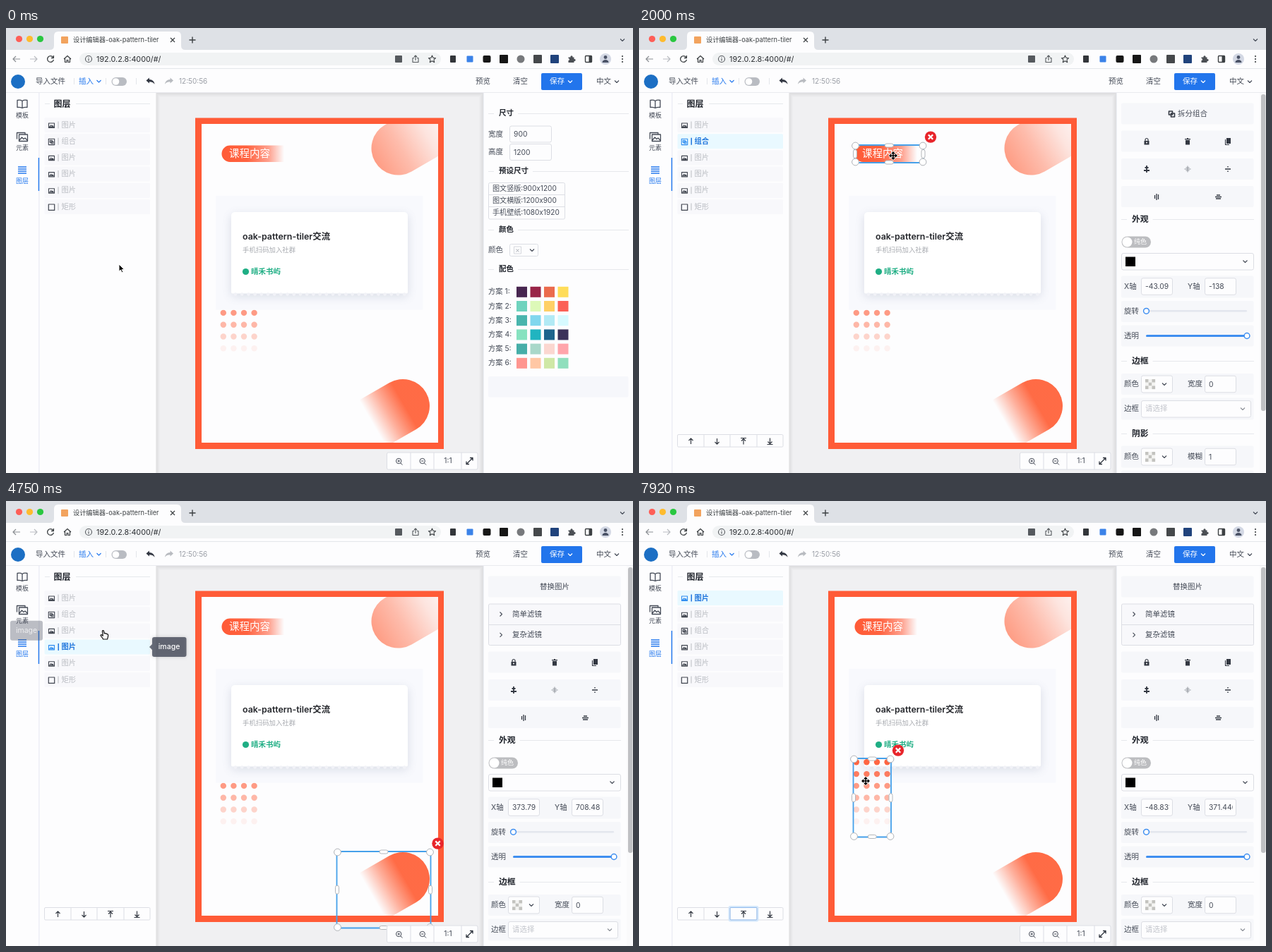
Recreate the animation shown at these times as an HTML page with a canvas. Size 888x631 px, loop 8000 ms.

```html
<!DOCTYPE html>
<html lang="zh-CN">
<head>
<meta charset="utf-8">
<title>设计编辑器</title>
<style>
html, body { margin: 0; width: 100%; height: 100%; overflow: hidden; background: #fff; }
canvas { display: block; width: 100vw; height: 100vh; }
</style>
</head>
<body>
<canvas id="stage" width="888" height="631"></canvas>
<script>
const c = document.getElementById('stage').getContext('2d');
const FONT = 'Inter, "Noto Sans CJK SC", "Noto Sans CJK", sans-serif';
const LOOP = 8000, STEP = 1000 / 12;
const INK = '#454b57', BLUE = '#2d8cf0', LINE = '#dcdee4', ORANGE = '#ff5b37', PALE = '#f6f7fa', WHITE = '#fdfdfe';
const APP = 'oak-pattern-tiler';

// ---- drawing helpers ----
function box(x, y, w, h, fill, r = 0, stroke, lw = 1) {
  c.beginPath();
  c.roundRect(x, y, w, h, r);
  if (fill) { c.fillStyle = fill; c.fill(); }
  if (stroke) { c.strokeStyle = stroke; c.lineWidth = lw; c.stroke(); }
}
function disc(x, y, r, fill, stroke, lw = 1) {
  c.beginPath();
  c.arc(x, y, r, 0, 7);
  if (fill) { c.fillStyle = fill; c.fill(); }
  if (stroke) { c.strokeStyle = stroke; c.lineWidth = lw; c.stroke(); }
}
function text(s, x, y, size = 10.5, color = INK, weight = 400, align = 'left') {
  c.font = `${weight} ${size}px ${FONT}`;
  c.textAlign = align;
  c.textBaseline = 'middle';
  c.fillStyle = color;
  c.fillText(s, x, y);
}
function icon(d, x, y, color = INK, lw = 1.2, fill) {
  const p = new Path2D(d);
  c.save();
  c.translate(x, y);
  if (fill) { c.fillStyle = fill; c.fill(p); }
  if (lw) { c.strokeStyle = color; c.lineWidth = lw; c.lineJoin = 'round'; c.stroke(p); }
  c.restore();
}
function clipped(x, y, w, h, draw) {
  c.save();
  c.beginPath();
  c.rect(x, y, w, h);
  c.clip();
  draw();
  c.restore();
}
const hline = (x1, x2, y, color = '#e6e8ec') => box(x1, Math.floor(y), x2 - x1, 1, color);
const chevron = (x, y, color = INK) => icon('M-3 -1.5L0 1.5L3 -1.5', x, y, color, 1.1);

// ---- browser window ----
function browser() {
  box(0, 0, 888, 31, '#dee1e6');
  ['#fe5e57', '#febb2e', '#29c740'].forEach((f, i) => disc(18.5 + 15 * i, 15.5, 4.6, f));
  icon('M62 31Q68 31 68 25V11Q68 5 74 5H242Q248 5 248 11V25Q248 31 254 31Z', 0, 0, '', 0, WHITE);
  box(78, 12, 10, 10, '#f2a35e', 1);
  text('设计编辑器-' + APP, 95, 17.5, 9.2, '#3c4043');
  icon('M-3 -3L3 3M3 -3L-3 3', 236, 17, '#3c4043', 1.2);
  icon('M-4.5 0H4.5M0 -4.5V4.5', 264, 17, '#3c4043', 1.4);
  chevron(873, 17);

  box(0, 31, 888, 27, WHITE);
  hline(0, 888, 57, '#e4e6ea');
  icon('M5 0H-5M-1 -4L-5 0L-1 4', 15, 44, '#8b8f94', 1.2);
  icon('M-5 0H5M1 -4L5 0L1 4', 39, 44, '#b9bcc1', 1.2);
  icon('M3.6 -2.6A4.4 4.4 0 1 0 4.4 .8M4.4 -5V-1.5H1', 63, 44, '#3c4043', 1.3);
  icon('M-5 0L0 -4.5L5 0M-3.5 -1V4.5H-1V1.5H1V4.5H3.5V-1', 87, 44, '#3c4043', 1.2);
  box(104, 35, 512, 18, '#f1f3f4', 9);
  disc(117, 44, 4.5, null, '#55595e', 1.1);
  icon('M0 -.6V2.4M0 -2.5V-1.4', 117, 44, '#55595e', 1.2);
  text('192.0.2.8:4000/#/', 128, 44.3, 10.8, '#2a2d31');

  box(551, 39, 10, 10, '#55595e', 1);
  icon('M-2 -1.5H-4V4.5H4V-1.5H2M0 2V-5M-2.2 -2.8L0 -5L2.2 -2.8', 580, 44, '#55595e', 1.1);
  icon('M0 -5L1.5 -1.6L5.1 -1.3L2.4 1.1L3.2 4.7L0 2.8L-3.2 4.7L-2.4 1.1L-5.1 -1.3L-1.5 -1.6Z', 603.5, 44, '#3c4043', 1.1);
  box(629, 39, 8, 10, '#33363a', 1);
  box(652.5, 39.5, 9, 9, '#3b82e8', 1);
  box(675.5, 39, 11, 10, '#161616', 2);
  box(699, 38, 12, 12, '#161616', 1);
  disc(729, 44, 5.5, '#77797c');
  box(747, 38, 12, 12, '#45484b', 1);
  box(771, 38, 12, 12, '#20437c', 1);
  icon('M-4.5 -2.5H-1.5A1.6 1.6 0 1 1 1.5 -2.5H3.5V0A1.6 1.6 0 1 1 3.5 3V5H-4.5V2A1.5 1.5 0 0 0 -4.5 -1Z', 801, 44, '', 0, '#4b4f54');
  box(820.5, 39.5, 9, 9, null, 1, '#3c4043', 1.4);
  box(825.5, 39.5, 4, 9, '#3c4043');
  disc(849, 44, 8, '#d3d8e4');
  disc(849, 41.5, 2.4, '#4a5266');
  icon('M-4.5 5A4.5 4 0 0 1 4.5 5Z', 849, 44, '', 0, '#4a5266');
  [40, 44, 48].forEach(y => disc(873, y, 1.1, '#3c4043'));
}

function header() {
  box(0, 58, 888, 34, WHITE);
  hline(0, 888, 91, '#e9eaef');
  disc(17, 76, 10, '#1c6fc4');
  text('导入文件', 42, 76);
  [96, 141, 184].forEach(x => box(x, 71, 1, 9, '#e3e5ea'));
  text('插入', 103, 75.5, 10.5, '#2478ee');
  chevron(131.5, 75.5, '#2478ee');
  box(149.5, 70, 21.5, 12, '#b9bcc2', 6);
  disc(155.5, 76, 4.8, '#fff');
  const bend = 'M-6 -1L-1.5 -5V-2.6C3 -2.4 5.5 .2 6 4.2C4 1.6 2 .8 -1.5 .8V3Z';
  icon(bend, 204.5, 75.5, '', 0, '#333843');
  c.save();
  c.scale(-1, 1);
  icon(bend, -231, 75.5, '', 0, '#b8bbc0');
  c.restore();
  text('12:50:56', 245, 75.5, 10, '#9a9ea6');
  text('预览', 665, 76);
  text('清空', 718, 76);
  box(758, 64, 58, 24, '#2275ec', 2);
  text('保存', 770, 76, 10.5, '#fff');
  chevron(799, 76, '#fff');
  text('中文', 836, 76);
  chevron(865, 76);
}

// ---- left side ----
function rail() {
  box(0, 92, 47, 539, WHITE);
  box(46.5, 92, 1, 539, '#dfe2ee');
  icon('M0 -4.5V5.5M0 -4.5C-2 -6 -5 -6 -7 -5.5V4.5C-4 4 -2 4.5 0 5.5C2 4.5 4 4 7 4.5V-5.5C5 -6 2 -6 0 -4.5', 23, 108, '#454b57', 1.3);
  icon('M-7.5 3V-6H4V-4M-4.5 -3.5H7.5V6H-4.5ZM-4 4.5L-.5 .5L2 3L4 1.5L7 4.5', 23, 154.5, '#454b57', 1.3);
  icon('M-6 -4.5H6M-6 -1.5H6M-6 1.5H6M-6 4.5H6', 23, 201.5, '#2478ee', 1.3);
  text('模板', 23, 124, 9, INK, 400, 'center');
  text('元素', 23, 170.5, 9, INK, 400, 'center');
  text('图层', 23, 217, 9, '#2478ee', 400, 'center');
  box(45.7, 184, 1.6, 47, '#2478ee');
}

const ROW = i => 137.5 + 23.2 * i;
const GLYPHS = {
  图片: k => icon('M-4 -3.2H4V3.2H-4ZM-2.8 2L-.8 -.4L.6 1L1.6 .2L2.8 2Z', 64.5, 0, k, 1.1),
  组合: k => icon('M-4.2 -4.2H4.2V4.2H-4.2ZM-2.2 -2.2H.8V.8H-2.2ZM-.6 -.6H2.4V2.4H-.6Z', 64.5, 0, k, 1.1),
  矩形: k => icon('M-4.2 -4.2H4.2V4.2H-4.2Z', 64.5, 0, k, 1.2)
};
function layers(n, sel) {
  box(47.5, 92, 165, 539, WHITE);
  hline(55, 62, 107);
  text('图层', 67.5, 108, 12, '#20242c', 600);
  hline(99, 204, 107);
  const order = ['card', 'title', 'dots', 'low', 'top', 'frame'];
  if (n >= 81) order.unshift(order.splice(2, 1)[0]);
  order.forEach((id, i) => {
    const on = id === sel, y = ROW(i);
    const name = id === 'title' ? '组合' : id === 'frame' ? '矩形' : '图片';
    box(54.5, y - 10.5, 149.5, 21, on ? '#e9f9ff' : '#f8f8fb', 1.5);
    c.save();
    c.translate(0, y + .7);
    GLYPHS[name](on ? BLUE : '#40454f');
    c.restore();
    const color = on ? '#2277dd' : '#b9bcc2';
    box(73.5, y - 5, on ? 1.5 : 1, 10, color);
    text(name, 78.5, y, 10.3, color, on ? 600 : 400);
  });
  if (!sel) return;
  box(54.5, 576.5, 149.5, 17.5, WHITE, 1.5, LINE);
  [92, 129, 167].forEach(x => box(x - .5, 576.5, 1, 17.5, LINE));
  if (n >= 82) box(127.5, 575, 41, 20.5, null, 2, '#d5e8fb', 2);
  if (n >= 79) box(129, 576.5, 38, 17.5, null, 1, n < 82 ? '#4a8fe6' : '#8db9ee');
  const up = 'M0 4V-4M-3 -1L0 -4L3 -1', down = 'M0 -4V4M-3 1L0 4L3 1';
  icon(up, 73.5, 586, '#333842');
  icon(down, 110.5, 586, '#333842');
  icon(up + 'M-4 -5H4', 148, 586.5, '#333842');
  icon(down + 'M-4 5H4', 185.5, 585.5, '#333842');
}

// ---- poster ----
function capsule(x, y, angle, r, stops) {
  c.save();
  c.translate(x, y);
  c.rotate(angle);
  const g = c.createLinearGradient(-r, 0, 80, 0);
  stops.forEach(([at, a]) => g.addColorStop(at, `rgba(255,98,58,${a})`));
  box(-r, -r, r + 120, r * 2, g, [r, 0, 0, r]);
  c.restore();
}
function dots() {
  for (let row = 0; row < 6; row++) {
    const y = 370.3 + row * 16.8;
    const a = Math.min(.92, (461 - y) / 95);
    for (let col = 0; col < 4; col++) disc(307.8 + col * 14.6, y, 4.2, `rgba(255,88,50,${a})`);
  }
}
function card() {
  box(297, 238, 293.5, 161.5, '#f8f9fd');
  c.save();
  c.shadowColor = 'rgba(90,105,140,.2)';
  c.shadowBlur = 14;
  c.shadowOffsetY = 4;
  box(319, 261, 250, 115.5, '#fff', [5, 5, 2, 2]);
  c.restore();
  for (let x = 325; x < 566; x += 9.2) disc(x, 377.6, 2.3, '#f1f2f7');
  text(APP + '交流', 335, 296, 12.4, '#24262b', 600);
  text('手机扫码加入社群', 335, 315, 9.4, '#a8abb0');
  disc(339.5, 345.5, 4.6, '#1fae84');
  text('晴禾书屿', 347, 345.5, 10.5, '#1fae84', 700);
}
function poster(n) {
  box(212, 92, 464, 539, '#f0f0f2');
  for (let i = 0; i < 6; i++) {
    box(212.5 + i, 92.5 + i, 463 - 2 * i, 545, null, 0, `rgba(0,0,0,${.08 - i * .014})`);
  }
  box(268, 127.5, 352, 469.5, ORANGE);
  box(277, 136, 335, 452, WHITE);
  clipped(277, 136, 335, 452, () => {
    capsule(555.5, 170.5, -Math.PI / 6, 38, [[0, .62], [.35, .42], [.7, .16], [1, .03]]);
    capsule(562, 536, Math.PI * 5 / 6, 38, [[0, .94], [.3, .94], [.52, .5], [.74, 0], [1, 0]]);
  });
  if (n < 81) dots();
  const g = c.createLinearGradient(306, 0, 394, 0);
  g.addColorStop(0, ORANGE);
  g.addColorStop(.4, '#ff6340');
  g.addColorStop(.75, 'rgba(255,98,66,.6)');
  g.addColorStop(1, 'rgba(255,100,70,0)');
  box(305.5, 166.5, 96.5, 23.5, g, [11.7, 0, 0, 11.7]);
  text('课程内容', 316, 178.3, 14.5, '#fff', 500);
  card();
  if (n >= 81) dots();
}

// left, top, right, bottom, X, Y
const ITEMS = {
  card: [297.5, 238.5, 591, 399.5, '-64.87', '44.2699'],
  title: [306.5, 167, 402, 190, '-43.09', '-138'],
  dots: [304.5, 366, 356, 475.5, '-48.831', '371.446'],
  low: [469.5, 498, 600.5, 604.5, '373.79', '708.48'],
  top: [518, 97.5, 654.5, 208.5, '497.62', '-315.654']
};
function selection(id) {
  const [l, t, r, b] = ITEMS[id], mx = (l + r) / 2, my = (t + b) / 2;
  box(l - 1, t - 1, r - l + 2, b - t + 2, null, 0, '#45a0ea', 1.8);
  const grip = (x, y, w, h) => box(x - w / 2, y - h / 2, w, h, '#fff', 2.5, '#b3b6ba');
  [t - .5, b + .5].forEach(y => grip(mx, y, 12, 5));
  [l - .5, r + .5].forEach(x => grip(x, my, 5, 12));
  for (const x of [l, r]) for (const y of [t, b]) disc(x, y, 4.9, '#fff', '#aeb1b6');
  disc(r + 11, t - 12.4, 8.2, '#e8252b');
  icon('M-3.2 -3.2L3.2 3.2M3.2 -3.2L-3.2 3.2', r + 11, t - 12.4, '#fff', 2.2);
}
function zoomBar() {
  box(539.5, 602, 128.5, 24, WHITE, 2, LINE);
  [573, 606, 645].forEach(x => box(x - .5, 602, 1, 24, LINE));
  const lens = 'M-4 -.5A3.7 3.7 0 1 1 3.4 -.5A3.7 3.7 0 1 1 -4 -.5M2.3 2.3L5 5M-2 -.5H1.4';
  icon(lens + 'M-.3 -2.2V1.2', 556.5, 614.5, '#454b57', 1);
  icon(lens, 590, 614.5, '#454b57', 1);
  text('1:1', 626, 614.2, 10.3, INK, 400, 'center');
  icon('M-4 4L4 -4M.5 -4.5H4.5V-.5M-4.5 .5V4.5H-.5', 656.5, 614, '#333842', 1.3);
}

// ---- right panel ----
function heading(s, y, size, right) {
  hline(683, 691, y);
  text(s, 698, y, size, '#20242c', 600);
  hline(704 + size * s.length, right, y);
}
function field(s, x, y, w, h) {
  box(x + .5, y - h / 2, w - 1, h, WHITE, 2.5, LINE);
  clipped(x + 3, y - h / 2, w - 8, h, () => text(s, x + 6, y + .5, 10.3));
}
const SCHEMES = [
  '482650 992548 eb6b4d ffdd59', '6fd3be ddf9b8 ffd066 fb6157', '49b5ad 80d7ee b2eaf5 d7faff',
  '87e2c0 20b4c0 1e648c 3a3159', '46aea8 a9d8c9 fbd7d0 ffa5ab', 'ff9690 ffc7a4 cfe8a6 90dfbd'
];
function pagePanel() {
  heading('尺寸', 121, 10.5, 882);
  text('宽度', 683, 150.5);
  field('900', 713, 150.5, 60, 23);
  text('高度', 683, 176);
  field('1200', 713, 176, 60, 23);
  heading('预设尺寸', 203, 10.5, 882);
  box(683.5, 219.5, 108, 51.5, WHITE, 2, LINE);
  ['图文竖版:900x1200', '图文横版:1200x900', '手机壁纸:1080x1920'].forEach((s, i) => {
    text(s, 689, 228 + i * 17.2, 10.1);
    if (i) hline(683.5, 791.5, 219.5 + i * 17.2, LINE);
  });
  heading('颜色', 286, 10.5, 882);
  text('颜色', 683, 315);
  box(713.5, 306.5, 40, 17, WHITE, 2, LINE);
  box(719.5, 310, 10, 10, WHITE, 0, '#d5d7dc');
  icon('M-2 -2L2 2M2 -2L-2 2', 724.5, 315.5, '#9a9ea6', .9);
  chevron(745, 315);
  heading('配色', 342, 10.5, 882);
  SCHEMES.forEach((s, i) => {
    const y = 374.3 + i * 20.2;
    text(`方案 ${i + 1}:`, 683, y, 10.3);
    s.split(' ').forEach((k, j) => box(723 + j * 19.5, y - 7.5, 15, 15, '#' + k));
  });
  box(683, 494, 198.5, 29.5, '#f6f7fb', 2);
}
function band(y, h = 30) { box(683, y - h / 2, 187.5, h, PALE, 2); }
function picker(y) {
  text('颜色', 687, y);
  box(711.5, y - 12, 44, 24, WHITE, 2.5, LINE);
  for (let i = 0; i < 9; i++) {
    box(717 + i % 3 * 4.7, y - 7 + (i / 3 | 0) * 4.7, 4.7, 4.7, i % 2 ? '#f4f4f2' : '#c3c3bf');
  }
  chevron(744, y);
}
function itemPanel(id) {
  const group = id === 'title', dy = group ? -68 : 0;
  box(879, 92, 9, 539, '#fafafb');
  box(881, 94, 6.5, group ? 449 : 405, '#bfc0c3', 3.2);
  band(121.5);
  if (group) {
    icon('M-4 -4H1V1H-4ZM-1 -1H4V4H-1Z', 754.5, 122, '#333842', 1.6);
    text('拆分组合', 763, 121.5);
  } else {
    text('替换图片', 777, 121.5, 10.5, INK, 400, 'center');
    box(683.5, 146, 187, 58.5, '#f8f8fb', 2, LINE);
    hline(683.5, 870.5, 175, LINE);
    ['简单滤镜', '复杂滤镜'].forEach((s, i) => {
      icon('M-1.5 -3L1.5 0L-1.5 3', 701, 160.5 + 29.3 * i, INK, 1.1);
      text(s, 717, 160.5 + 29.3 * i);
    });
  }
  c.save();
  c.translate(0, dy);
  [228.5, 268, 307].forEach(y => band(y));
  const dark = '#333842';
  icon('M-3.5 -1H3.5V4.5H-3.5Z', 719, 229, '', 0, dark);
  icon('M-2 -1V-2.5A2 2 0 0 1 2 -2.5V-1', 719, 229, dark, 1.2);
  disc(719, 230.5, 1, '#fff');
  icon('M-3 -2H3V4.5H-3ZM-4 -4H4V-2.8H-4ZM-1 -5H1V-4H-1Z', 777, 229, '', 0, dark);
  icon('M-2 -5H4V3H-2Z', 834, 229, '', 0, dark);
  icon('M-3.5 -3V4.5H2', 834, 229, dark, 1.1);
  icon('M0 -5V5M-2.5 -2H2.5M-4 2H4', 719, 268, dark, 1.8);
  icon('M0 -4.5V4.5M-4.5 0H4.5M-2.5 -2H2.5M-2.5 2H2.5', 777, 268, '#8d9199', .9);
  icon('M-4 0H4M0 -4V-2.6M0 2.6V4', 834, 268, dark, 1.5);
  icon('M0 -4.5V4.5M-2.5 -2.5V2.5M2.5 -3.5V3.5', 733, 307.5, dark, 1.3);
  icon('M-4.5 0H4.5M-2.5 -2.5H2.5M-3.5 2.5H3.5', 820.5, 307.5, dark, 1.3);

  heading('外观', 339, 11.8, 871);
  box(683.5, 363.5, 41.5, 16, '#bcbdc0', 8);
  disc(691.5, 371.5, 7, '#fff');
  text('纯色', 701, 371.5, 9, '#fff');
  box(683.5, 387.5, 187, 23.5, WHITE, 2.5, LINE);
  box(689, 392.5, 14, 13.5, '#000');
  chevron(858.5, 399);
  band(435, 31);
  text('X轴', 687, 435);
  field(ITEMS[id][4], 711, 434.5, 45, 23.5);
  text('Y轴', 777, 435);
  field(ITEMS[id][5], 801, 434.5, 45, 23.5);
  band(470);
  text('旋转', 687, 470);
  box(718, 468, 143, 2.6, '#e3e6ee', 1.3);
  disc(718.5, 469.3, 3.9, '#fff', '#3f8ff0', 1.5);
  band(504.5);
  text('透明', 687, 505);
  box(718, 503, 143, 3, '#3f8ff0', 1.5);
  disc(861, 504.5, 3.9, '#fff', '#3f8ff0', 1.5);

  heading('边框', 540.5, 11.8, 871);
  band(573);
  picker(573);
  text('宽度', 777, 573);
  field('0', 801, 573, 45, 23.5);
  band(608, 31);
  text('边框', 687, 608);
  box(711.5, 596.5, 155, 23.5, WHITE, 2.5, LINE);
  text('请选择', 717, 608, 10.5, '#c0c3ca');
  chevron(855, 608, '#8d9199');
  if (group) {
    heading('阴影', 643.5, 11.8, 871);
    band(676, 31);
    picker(676);
    text('模糊', 777, 676);
    field('1', 801, 676, 45, 23.5);
    box(683, 695.5, 187.5, 20, PALE, 2);
  }
  c.restore();
}

// ---- tooltips and pointer ----
function tip(row, ghost) {
  const x = ghost ? 6 : 207, y = ROW(row) - .2;
  c.save();
  c.globalAlpha = ghost ? .36 : .8;
  c.shadowColor = 'rgba(0,0,0,.2)';
  c.shadowBlur = ghost ? 0 : 5;
  box(x, y - 14, ghost ? 46 : 48.5, 28, '#464c5b', 3);
  c.shadowBlur = 0;
  if (!ghost) icon('M0 -4L-4 0L0 4Z', x, y, '', 0, '#464c5b');
  c.globalAlpha = ghost ? .75 : 1;
  text('image', x + (ghost ? 23 : 24), y, 10.5, '#fff', ghost ? 400 : 500, 'center');
  c.restore();
}

// step, x, y
const PATH = [
  [4, 160, 335], [10, 345, 181], [12, 345, 181], [14, 400, 258], [17, 462, 193], [18, 455, 187],
  [19, 455, 187], [23, 362, 181], [24, 360, 181], [26, 360, 181], [33, 555, 180], [35, 563, 183],
  [36, 563, 183], [40, 313, 282], [43, 137, 230], [45, 137, 228], [46, 137, 212], [53, 137, 212],
  [57, 139, 190], [61, 139, 190], [71, 124, 553], [79, 155, 588], [81, 155, 588],
  [91, 363, 346], [92, 369, 337], [95, 321, 397]
];
function pointerAt(n) {
  const i = PATH.findIndex(p => p[0] >= n);
  if (i < 1) return PATH[i ? PATH.length - 1 : 0].slice(1);
  const [a, x0, y0] = PATH[i - 1], [b, x1, y1] = PATH[i];
  const k = (n - a) / (b - a), e = b - a > 4 ? k * k * (3 - 2 * k) : k;
  return [x0 + (x1 - x0) * e, y0 + (y1 - y0) * e];
}
function pointer(n, sel) {
  const [x, y] = pointerAt(n);
  const inList = x > 54 && x < 204 && (y > 127 && y < 264 || sel && y > 576 && y < 595);
  const [, t, r] = ITEMS[sel] || [0, -99, -99];
  const onDelete = Math.hypot(x - r - 11, y - t + 12.4) < 9;
  if (inList || onDelete) {
    icon('M-2.6 -5.5C-2.4 -6.8 -.8 -6.8 -.5 -5.5L.2 -2.2C1 -2.8 1.8 -2.5 2.2 -1.8C3 -2.3 3.7 -1.9 4 -1.2C5 -1.5 5.6 -.8 5.6 .2C5.8 3 4.8 4 4.6 6H-1.4C-2 4 -4 2.4 -5 .8C-5.2 -.4 -3.8 -.7 -2.9 .3L-1.7 1.2Z', x, y, '#111', 1.2, '#fff');
  } else if (x > 268 && x < 620 && y > 128 && y < 597) {
    const move = 'M-4.5 0H4.5M0 -4.5V4.5M-2.8 -2L-5 0L-2.8 2M2.8 -2L5 0L2.8 2M-2 -2.8L0 -5L2 -2.8M-2 2.8L0 5L2 2.8';
    icon(move, x, y, '#fff', 3);
    icon(move, x, y, '#000', 1.5);
  } else {
    icon('M0 0V10.2L2.4 8L4 11.8L5.8 11L4.2 7.4H7.4Z', x, y, '#fff', 1, '#000');
  }
}

// first step of each selected item
const PICKS = [[0, ''], [9, 'title'], [14, 'card'], [23, 'title'], [33, 'top'], [49, 'low'], [60, 'dots']];

function render(ms) {
  const n = Math.min(95, Math.floor((ms + 4) / STEP));
  const sel = PICKS.filter(p => p[0] <= n).pop()[1];
  poster(n);
  if (sel) clipped(212, 92, 464, 539, () => selection(sel));
  zoomBar();
  box(676, 92, 212, 539, WHITE);
  box(675.5, 92, 1, 539, '#e0e2e8');
  clipped(676, 92, 212, 539, () => sel ? itemPanel(sel) : pagePanel());
  browser();
  header();
  rail();
  layers(n, sel);
  if (n === 45) tip(4, true);
  if (n >= 46 && n < 49) { tip(4); tip(3, true); }
  if (n >= 49 && n < 58) tip(3);
  if (n === 57) tip(2, true);
  if (n >= 58 && n < 64) tip(2);
  pointer(n, sel);
}

const start = performance.now();
function loop() {
  render((performance.now() - start) % LOOP);
  requestAnimationFrame(loop);
}
loop();
</script>
</body>
</html>
```
